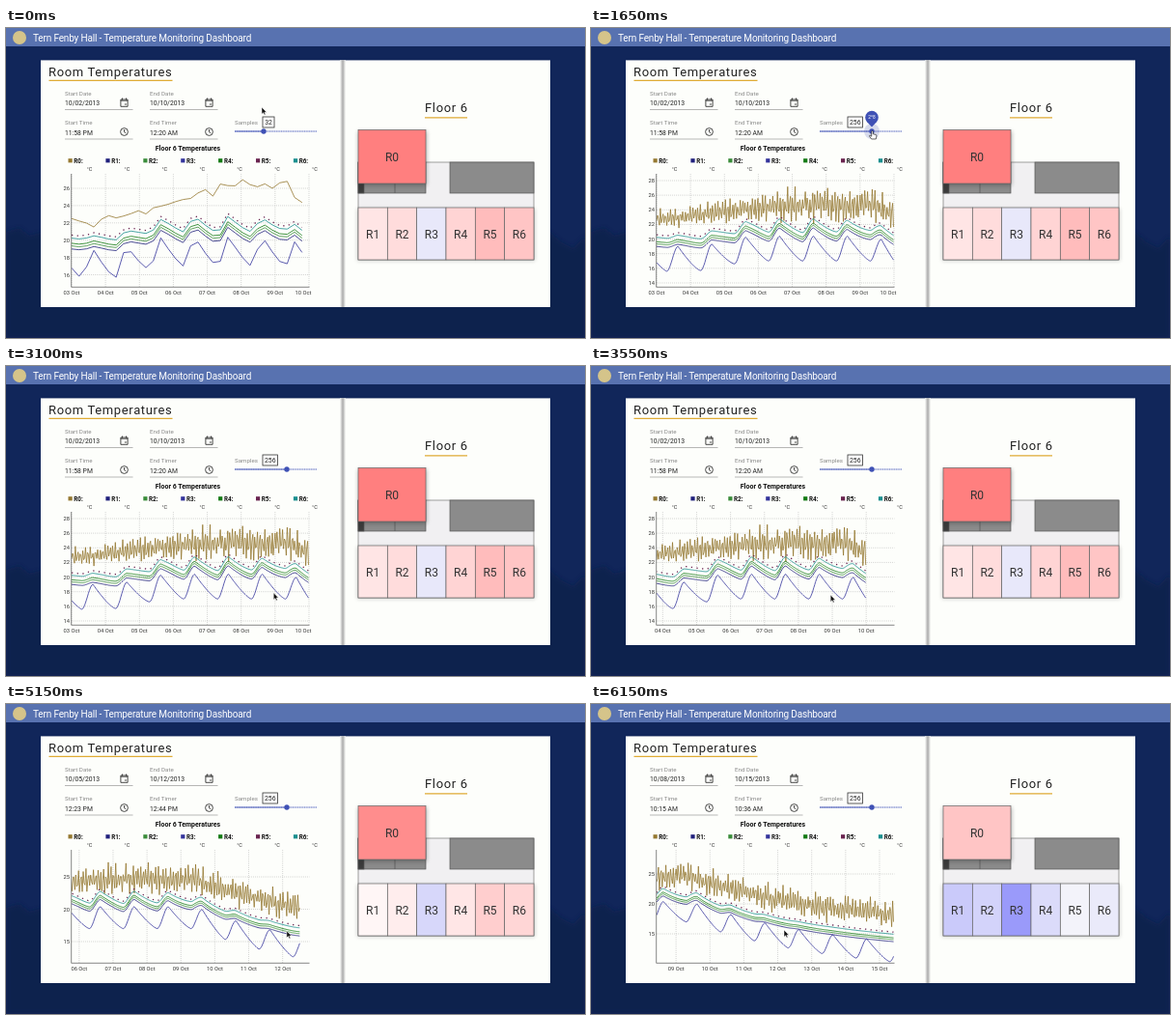
Animation, 600 px wide and 321 px high, one loop 6200 ms. Source, as an HTML page:

```html
<!DOCTYPE html>
<html lang="en">
<head>
<meta charset="utf-8">
<title>Temperature Monitoring Dashboard</title>
<style>
html, body { margin: 0; width: 100%; height: 100%; overflow: hidden; background: #11265a; }
svg { display: block; width: 600px; height: 321px; font-family: Roboto, Arial, sans-serif; fill: #222; }
.head { font-size: 10px; letter-spacing: -.16px; fill: #fff; }
.title { font-size: 13px; letter-spacing: .65px; }
.label { font-size: 6.2px; fill: #888; }
.value { font-size: 6.8px; }
.bold { font-weight: 700; font-size: 7px; fill: #111; text-anchor: middle; }
.key { font-weight: 700; font-size: 6.3px; fill: #111; }
.unit { font-size: 5.5px; fill: #333; }
.tick { font-size: 5.8px; fill: #333; }
.room { font-size: 12px; fill: #333; text-anchor: middle; }
.grid { stroke: #bbb; stroke-width: .6; stroke-dasharray: 1 1; }
.icon { fill: none; stroke: #333; stroke-width: .9; }
.series { fill: none; stroke-width: .8; stroke-linejoin: round; }
</style>
</head>
<body>
<svg viewBox="0 0 600 321">
  <defs>
    <linearGradient id="fold">
      <stop offset="0" stop-color="#fdfefb"/>
      <stop offset=".5" stop-color="#aaa"/>
      <stop offset="1" stop-color="#fdfefb"/>
    </linearGradient>
    <filter id="soft" x="-20%" y="-20%" width="140%" height="140%"><feGaussianBlur stdDeviation="2"/></filter>
    <clipPath id="plot"><rect x="68" y="151" width="246.5" height="117"/></clipPath>
  </defs>

  <rect width="600" height="321" fill="#11265a"/>
  <path d="M0 211L14 207 24 215 36 212H564L576 222 588 228 600 216V321H0Z" fill="#10214c" opacity=".8" filter="url(#soft)"/>
  <rect width="600" height="19" fill="#5872b0"/>
  <circle cx="14" cy="10" r="7" fill="#d5c48a"/>
  <text class="head" x="28" y="13.5">Tern Fenby Hall - Temperature Monitoring Dashboard</text>

  <rect x="36" y="33.4" width="528" height="255.6" fill="#fdfefb"/>
  <rect x="346" y="33.4" width="6" height="255.6" fill="url(#fold)"/>
  <text class="title" x="44" y="49.5">Room Temperatures</text>
  <path d="M44.5 54.3H172.5M434 92.8H478" stroke="#dfab35" stroke-width="1.3"/>
  <g id="form"></g>

  <text class="label" x="237" y="100">Samples</text>
  <rect id="box" x="266" y="92" height="11" fill="#fff" stroke="#333" stroke-width=".8"/>
  <text id="count" class="value" y="100" text-anchor="middle"></text>
  <path d="M237 107H322" stroke="#aab3df" stroke-width="1.1"/>
  <path d="M237 107H322" stroke="#4254b6" stroke-width="1.1" stroke-dasharray="1 1.4" opacity=".6"/>
  <path id="fill" stroke="#4254b6" stroke-width="1.1" opacity=".7"/>
  <g id="thumb">
    <g id="bubble">
      <circle r="8" fill="#3f51b5" opacity=".2"/>
      <path d="M0 -4.5L-5 -9.8A6.8 6.8 0 1 1 5 -9.8Z" fill="#3f51b5"/>
      <text id="power" y="-12.6" font-size="4.8" fill="#fff" text-anchor="middle"></text>
    </g>
    <circle r="2.7" fill="#3f51b5"/>
  </g>

  <text class="bold" x="188.5" y="127.2">Floor 6 Temperatures</text>
  <g id="legend"></g>
  <g id="axes"></g>
  <g id="lines" clip-path="url(#plot)"></g>
  <path d="M67.7 151V268.3H314.5" fill="none" stroke="#555" stroke-width=".7"/>

  <text class="title" x="434" y="87">Floor 6</text>
  <g stroke="#555" stroke-width=".7">
    <rect x="365" y="139" width="182" height="101" fill="#f1f0f2" stroke="#777"/>
    <rect x="365" y="139" width="70" height="32" fill="#8b8b8b"/>
    <rect x="365" y="139" width="6" height="32" fill="#3c3c3c"/>
    <path d="M403 139V171"/>
    <rect x="460" y="139" width="87" height="32" fill="#8b8b8b"/>
  </g>
  <rect x="365" y="107" width="71" height="56" opacity=".35" filter="url(#soft)"/>
  <rect x="364" y="187" width="184" height="54" opacity=".22" filter="url(#soft)"/>
  <g id="rooms"></g>

  <g id="arrow"><path d="M0 0V7.2L1.7 5.7 2.8 8.1 4 7.5 2.9 5.2H5.1Z" fill="#111" stroke="#fff" stroke-width=".5"/></g>
  <g id="hand"><path d="M-.8 0Q0 -1 .8 0V2.8L3.8 3.5Q4.6 3.8 4.4 5L3.8 8H-.9L-3 5Q-3 3.8 -1.8 4.4L-.8 5.2Z" fill="#fff" stroke="#222" stroke-width=".7"/></g>
</svg>

<script>
const LOOP = 6200, LEFT = 68, WIDTH = 246.5, DAY = 35.14, DAYS = WIDTH / DAY;
const $ = id => document.getElementById(id);
const range = n => [...Array(n).keys()];
const ease = p => { p = Math.min(1, Math.max(0, p)); return p * p * (3 - 2 * p); };
const rand = i => { const s = Math.sin(i * 127.1) * 43758.5; return s - Math.floor(s); };
const text = (cls, x, y, s, more = '') => `<text class="${cls}" x="${x}" y="${y}" ${more}>${s}</text>`;

// Temperature rules; t counts days from 3 October.
const cooled = t => 9 * (1 - Math.exp(-Math.max(0, t - 6.4) / 4.4));
const trend = t => 19.6 + 1.4 * ease((t - 1) / 2) - cooled(t);

// Quick morning rise, slow fall until the next day.
function sun(t) {
  const p = (t + .7) % 1, rise = .33;
  return p < rise ? ease(p / rise) : ((1 - p) / (1 - rise)) ** 1.3;
}

const house = shift => t =>
  trend(t) + shift + 1.9 * Math.exp(-(((t - 4.2) / 3) ** 2)) * (sun(t) - .4);
const cool = t => trend(t) - 4 + 3.4 * sun(t);

// A fast cycle: 32 samples a week alias it into one slow wave.
function living(t) {
  const warm = ease(t / 4), i = Math.round(t * 256 / DAYS);
  const wave = Math.sin(2 * Math.PI * (13.6 * t - .25));
  return 22.8 + 1.8 * warm - .95 * cooled(t) + wave * (1 + .8 * warm) * (.3 + 1.2 * rand(i));
}

const SERIES = [
  { color: '#957830', temp: living },
  { color: '#20207c', temp: house(-.6) },
  { color: '#3a8c3a', temp: house(-.25) },
  { color: '#34349c', temp: cool },
  { color: '#147a14', temp: house(.05) },
  { color: '#6a2450', temp: house(1), dash: '1.3 4.4' },
  { color: '#1b8f8f', temp: house(.65) },
];

// Successive data loads: sample count, first day, scale and form values.
const week = { start: 0, form: ['10/02/2013', '10/10/2013', '11:58 PM', '12:20 AM'] };
const fine = { ...week, top: 28, y: 158, unit: 7.57, step: 2 };
const LOADS = [
  { at: 0, n: 32, ...week, top: 26, y: 166, unit: 8.95, step: 2 },
  { at: 1250, n: 64, ...fine },
  { at: 1450, n: 128, ...fine },
  { at: 1650, n: 256, ...fine },
  { at: 3950, n: 256, start: 2.516, top: 25, y: 179, unit: 6.7, step: 5,
    form: ['10/05/2013', '10/12/2013', '12:23 PM', '12:44 PM'] },
  { at: 5850, n: 256, start: 5.427, top: 25, y: 176, unit: 6.2, step: 5,
    form: ['10/08/2013', '10/15/2013', '10:15 AM', '10:36 AM'] },
];

// Pointer moves; one with a drop time drags the chart until the reload.
const MOVES = [
  { from: 250, to: 700, x: 271, y: 106 },
  { from: 1150, to: 1700, x: 292, y: 107 },
  { from: 2500, to: 3150, x: 277, y: 237 },
  { from: 3365, to: 3850, x: 188.5, y: 237, drop: 3950 },
  { from: 3850, to: 4050, x: 198, y: 236 },
  { from: 4450, to: 4920, x: 300, y: 235 },
  { from: 5020, to: 5715, x: 200, y: 234, drop: 5850 },
];

function pointer(t) {
  let x = 265, y = 82, shift = 0;
  for (const m of MOVES) {
    const p = ease((t - m.from) / (m.to - m.from)), dx = (m.x - x) * p;
    if (t < m.drop) shift += dx;
    x += dx;
    y += (m.y - y) * p;
    if (p < 1) break;
  }
  return { x, y, shift };
}

const FIELDS = ['Start Date', 'End Date', 'Start Time', 'End Timer'];
function drawForm(values) {
  $('form').innerHTML = FIELDS.map((name, i) => {
    const x = i % 2 ? 149 : 61, y = i < 2 ? 69.5 : 100, ix = x + 61.5, iy = y + 7.5;
    const icon = i < 2
      ? '<path d="M-3.6-3h7.2v7.3h-7.2zM-2-4.5v2M2-4.5v2M-3.6-1.8h7.2M.4 2h2"/>'
      : '<circle r="3.9"/><path d="M0-2.4v2.6l1.8 1.2"/>';
    return text('label', x, y, name) + text('value', x, y + 10.5, values[i]) +
      `<path d="M${x} ${y + 15}h70.5" stroke="#999" stroke-width=".7"/>` +
      `<g class="icon" transform="translate(${ix} ${iy})">${icon}</g>`;
  }).join('');
}

// Red above 19 degrees, blue below, by the mean over the window.
function tint(temp, start) {
  const mean = range(200).reduce((sum, i) => sum + temp(start + i / 200 * DAYS), 0) / 200;
  const heat = (mean - 19) / 10, c = Math.round(255 * (1 - Math.abs(heat)));
  return heat > 0 ? `rgb(255,${c},${c})` : `rgb(${c},${c},250)`;
}

function drawRooms(start) {
  $('rooms').innerHTML = SERIES.map(({ temp }, i) => {
    const [x, y, w, h] = i ? [365 + (i - 1) * 30.33, 186, 30.33, 54] : [365, 105.5, 70, 55.5];
    return `<rect x="${x}" y="${y}" width="${w}" height="${h}" fill="${tint(temp, start)}" stroke="#666" stroke-width=".7"/>` +
      text('room', x + w / 2, y + h / 2 + 4.6, 'R' + i);
  }).join('');
}

function drawAxes(load, shift) {
  let out = '';
  for (let v = load.top, y; (y = load.y + (load.top - v) * load.unit) < 267; v -= load.step) {
    out += `<path class="grid" d="M68 ${y}H314.5"/>` + text('tick', 66, y + 2, v, 'text-anchor="end"');
  }
  for (const d of range(14)) {
    const x = LEFT + (d - load.start) * DAY + shift;
    if (x < 67.5 || x > 314.6) continue;
    out += `<path class="grid" d="M${x} 151V268"/>` +
      text('tick', Math.min(x, 308), 275.6, String(d + 3).padStart(2, '0') + ' Oct', 'text-anchor="middle"');
  }
  $('axes').innerHTML = out;
}

function drawLines(load) {
  $('lines').innerHTML = '<g id="pan">' + SERIES.map(({ color, temp, dash }) => {
    const d = range(load.n).map(i => {
      const p = i / load.n, v = temp(load.start + p * DAYS);
      return (LEFT + p * WIDTH).toFixed(1) + ' ' + (load.y + (load.top - v) * load.unit).toFixed(1);
    }).join('L');
    const style = dash ? `stroke-dasharray="${dash}" style="stroke-width:1.3"` : '';
    return `<path class="series" d="M${d}" stroke="${color}" ${style}/>`;
  }).join('') + '</g>';
}

function drawSlider(n) {
  const power = Math.log2(n), x = 267 + (power - 5) * 8, w = n > 99 ? 15.5 : 12;
  $('box').setAttribute('width', w);
  $('count').setAttribute('x', 266 + w / 2);
  $('count').textContent = n;
  $('power').textContent = '2^' + power;
  $('fill').setAttribute('d', `M237 107H${x}`);
  $('thumb').setAttribute('transform', `translate(${x} 107)`);
}

$('legend').innerHTML = SERIES.map(({ color }, i) => {
  const x = 64.5 + i * 38.9;
  return `<rect x="${x}" y="135.2" width="4.2" height="4.2" fill="${color}"/>` +
    text('key', x + 5.8, 139.5, `R${i}:`) + text('unit', x + 19.2, 147.6, '°C');
}).join('');

let shown, lastShift;
function render(t) {
  const load = LOADS.filter(l => l.at <= t).pop();
  const { x, y, shift } = pointer(t);
  if (load !== shown) {
    drawForm(load.form);
    drawRooms(load.start);
    drawSlider(load.n);
    drawLines(load);
  }
  if (load !== shown || shift !== lastShift) {
    drawAxes(load, shift);
    $('pan').setAttribute('transform', `translate(${shift} 0)`);
  }
  shown = load;
  lastShift = shift;

  const onSlider = t >= 600 && t < 2600;
  for (const id of ['arrow', 'hand']) {
    $(id).setAttribute('transform', `translate(${x} ${y})`);
    $(id).style.display = (id === 'hand') === onSlider ? '' : 'none';
  }
  $('bubble').style.display = onSlider ? '' : 'none';
}

const begin = performance.now();
function tick() {
  const t = (performance.now() - begin) % LOOP;
  render(Math.floor(t / 50) * 50);
  requestAnimationFrame(tick);
}
tick();
</script>
</body>
</html>
```
